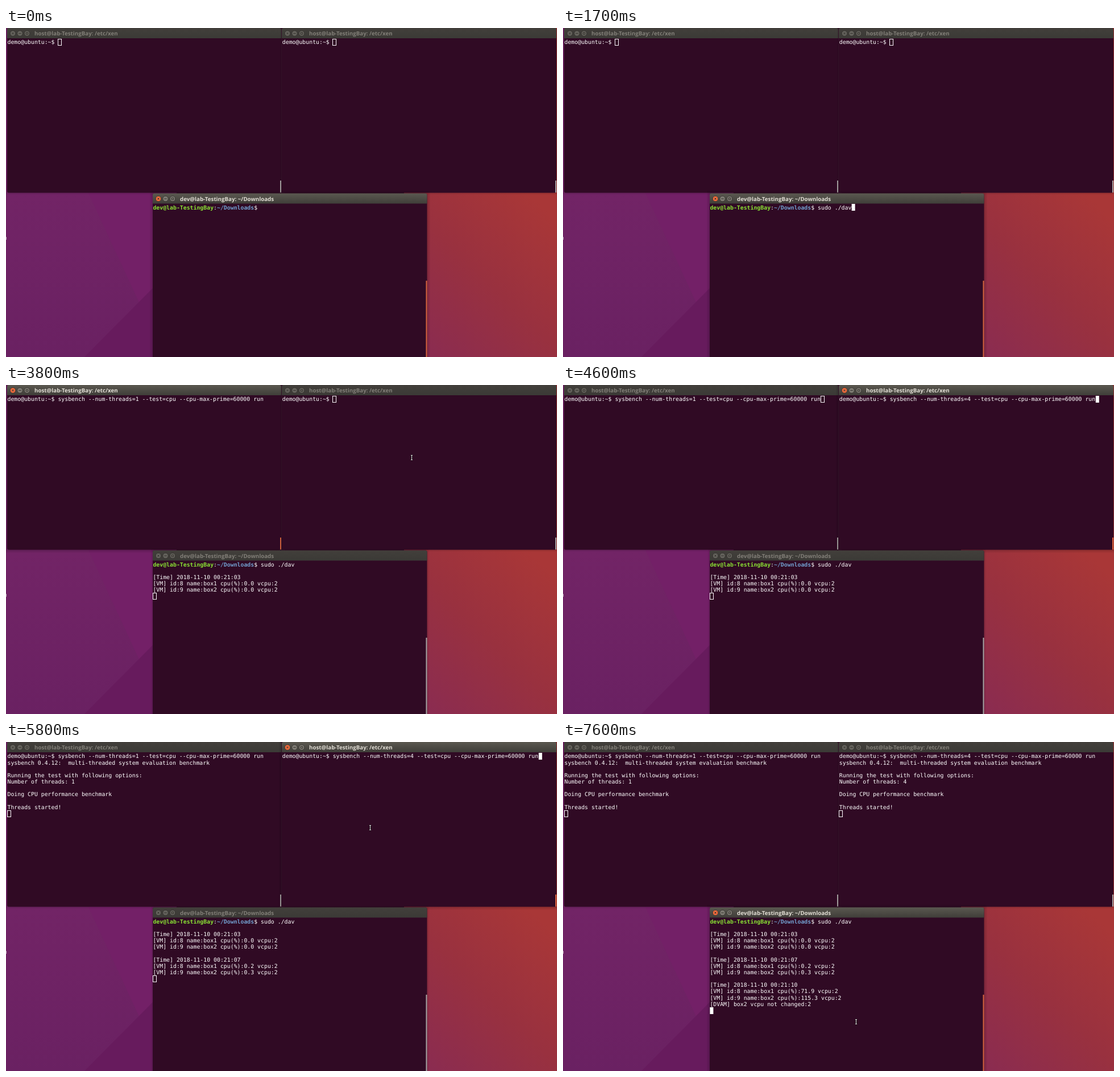
These frames come from a looping animation (969 by 578 pixels, 8000 ms). An HTML page:

```html
<!DOCTYPE html>
<html lang="en">
<head>
<meta charset="utf-8">
<title>Three terminals</title>
<style>
html, body { margin: 0; width: 100%; height: 100%; overflow: hidden; background: #300a24; }
svg { display: block; width: 100%; height: 100%; }
text { white-space: pre; text-rendering: geometricPrecision; }
.term text { font: 9.86px "DejaVu Sans Mono", monospace; fill: #fff; }
.title { font: bold 9.75px "Open Sans", sans-serif; }
.b { font-weight: bold; }
</style>
</head>
<body>
<svg viewBox="0 0 969 578">
  <defs>
    <linearGradient id="left" x1="0" y1="0" x2="0" y2="1">
      <stop offset=".5" stop-color="#722466"/><stop offset="1" stop-color="#6a2162"/>
    </linearGradient>
    <linearGradient id="right" gradientUnits="userSpaceOnUse" x1="725" y1="550" x2="950" y2="320">
      <stop offset="0" stop-color="#8b2c50"/><stop offset=".5" stop-color="#99313f"/><stop offset="1" stop-color="#a93737"/>
    </linearGradient>
    <linearGradient id="on" x2="0" y2="1">
      <stop stop-color="#5b5850"/><stop offset="1" stop-color="#3f3e39"/>
    </linearGradient>
    <linearGradient id="off" x2="0" y2="1">
      <stop stop-color="#423f3b"/><stop offset="1" stop-color="#3b3a36"/>
    </linearGradient>
  </defs>
  <rect width="300" height="578" fill="url(#left)"/>
  <path d="M145 290H258V495H240Z" fill="#732067"/>
  <path d="M258 457V578H138Z" fill="#671b5d"/>
  <rect x="700" width="269" height="578" fill="url(#right)"/>
  <rect x="480" width="10" height="290" fill="#3f1632"/>
  <path d="M0 367v5" stroke="#ddd" stroke-width="1.5"/>
  <g id="scene"></g>
</svg>
<script>
const LOOP = 8000, STEP = 100, CHAR = 5.934, ROW = 11.17;
const scene = document.getElementById('scene');

const HOST = 'lab-TestingBay';
const wins = [
  { x: 2, y: 0, w: 482, h: 289.5, title: `host@${HOST}: /etc/xen`, tx: 2.5, ty: 25, bar: [268, 289] },
  { x: 485, y: 0, w: 483, h: 289.5, title: `host@${HOST}: /etc/xen`, tx: 485.8, ty: 25, bar: [268, 289] },
  { x: 258, y: 290.5, w: 482.5, h: 290, title: `dev@${HOST}: ~/Downloads`, tx: 258.4, ty: 315.2, bar: [444, 578] }
];

const focusAt = [[0, 2], [2700, 0], [4000, 1], [5300, 0], [5800, 1], [6500, 2]];
const blinkFrom = [-600, 300, 1300, 1700, 2200, 2700, 3200, 4000, 4400, 4600, 5300, 5500, 5900, 6400, 7600];

// Pointer trips: shown from, hidden at, then [time, x, y] points
const trips = [
  [300, 1300, [300, 966, 24], [1000, 549, 358]],
  [2500, 3100, [2400, 549, 358], [2700, 334.5, 187.5]],
  [3600, 4400, [3600, 345.5, 184.5], [3800, 713.5, 127.5]],
  [4800, 5500, [4700, 713.5, 127.5], [5200, 339.5, 164.5]],
  [5600, 5900, [5500, 339.5, 164.5], [5800, 640.5, 150.5]],
  [6000, 8000, [5900, 640.5, 150.5], [6300, 515.5, 491.5]]
];

const last = (list, t) => list.filter(e => e[0] <= t).pop()[1];
const rect = (x, y, w, h, extra) => `<rect x="${x}" y="${y}" width="${w}" height="${h}" ${extra}/>`;

function shadow(w, active) {
  let s = '';
  for (let d = 1; d <= (active ? 5 : 3); d += 2)
    s += rect(w.x - d, w.y - d, w.w + 2 * d, w.h + 2 * d, 'rx="4" opacity=".06"');
  return s;
}

function button(x, y, kind, active) {
  const glyph = ['M-1.6-1.6 1.6 1.6M1.6-1.6-1.6 1.6', 'M-2.2 0H2.2', 'M-1.7-1.7H1.7V1.7H-1.7Z'][kind];
  const fill = !active ? '#64625c' : kind ? '#7d7a72' : '#ee6b3d';
  return `<g transform="translate(${x} ${y})"><circle r="4.8" fill="${fill}" stroke="#302f2b" stroke-width=".8"/>
    <path d="${glyph}" fill="none" stroke="#35332e"/></g>`;
}

function cursor(w, col, row, active, lit) {
  const x = w.tx + col * CHAR, y = Math.round(w.ty + row * ROW - 6);
  if (!active) return rect(Math.floor(x) + .5, y + .5, 6, 11, 'fill="none" stroke="#fff"');
  return lit ? rect(x, y, 6, 12, 'fill="#fff"') : '';
}

function drawWindow(w, lines, at, active, hotBar, lit) {
  const cy = w.y + 9.5;
  let s = shadow(w, active) + rect(w.x, w.y, w.w, w.h, 'rx="3" fill="#300a24"');
  s += `<path d="M${w.x} ${w.y + 18}v-15q0-3 3-3h${w.w - 6}q3 0 3 3v15z" fill="url(#${active ? 'on' : 'off'})"/>`;
  for (let i = 0; i < 3; i++) s += button(w.x + 10 + i * 12.5, cy, i, active);
  s += `<text class="title" x="${w.x + 48}" y="${cy + 3.6}" fill="${active ? '#e2ded5' : '#827f78'}">${w.title}</text>`;
  s += rect(w.x + w.w - 2, w.bar[0], 2, w.bar[1] - w.bar[0], `fill="${hotBar ? '#d9643f' : '#aaa5a5'}"`);
  s += '<g class="term">';
  lines.forEach((line, i) => {
    if (line) s += `<text x="${w.tx}" y="${w.ty + 3.4 + i * ROW}">${line}</text>`;
  });
  return s + '</g>' + cursor(w, ...at, active, lit);
}

function benchmark(t, threads, recall, enter) {
  const typed = last([[0, ''], [recall[0], 'clear'],
    [recall[1], `sysbench --num-threads=${threads} --test=cpu --cpu-max-prime=60000 run`]], t);
  const prompt = 'demo@ubuntu:~$ ' + typed;
  if (t < enter) return [[prompt], [prompt.length, 0]];
  return [[prompt, 'sysbench 0.4.12:  multi-threaded system evaluation benchmark', '',
    'Running the test with following options:', 'Number of threads: ' + threads, '',
    'Doing CPU performance benchmark', '', 'Threads started!'], [0, 9]];
}

function monitor(t) {
  const cmd = 'sudo ./dav';
  const n = t < 1300 ? 0 : Math.min(cmd.length, 2 * (Math.floor((t - 1300) / STEP) + 1));
  const lines = [`<tspan class="b" fill="#8ae234">dev@${HOST}</tspan>:` +
    `<tspan class="b" fill="#729fcf">~/Downloads</tspan>$ ` + cmd.slice(0, n)];
  if (t < 2200) return [lines, [`dev@${HOST}:~/Downloads$ `.length + n, 0]];
  const report = (sec, a, b) => lines.push('', '[Time] 2018-11-10 00:21:' + sec,
    `[VM] id:8 name:box1 cpu(%):${a} vcpu:2`, `[VM] id:9 name:box2 cpu(%):${b} vcpu:2`);
  report('03', '0.0', '0.0');
  if (t >= 4900) report('07', '0.2', '0.3');
  if (t >= 7600) {
    report('10', '71.9', '115.3');
    lines.push('[DVAM] box2 vcpu not changed:2');
  }
  return [lines, [0, lines.length]];
}

function pointer(t) {
  const trip = trips.find(p => t >= p[0] && t < p[1]);
  if (!trip) return '';
  const [, , a, b] = trip;
  const k = Math.min(1, (t - a[0]) / (b[0] - a[0]));
  const x = a[1] + (b[1] - a[1]) * k, y = a[2] + (b[2] - a[2]) * k;
  const d = 'M-1.5-4H1.5M0-4V4M-1.5 4H1.5';
  return `<g transform="translate(${x} ${y})"><path d="${d}" stroke="#111" stroke-width="2"/><path d="${d}" stroke="#ddd"/></g>`;
}

function draw(t) {
  const focus = last(focusAt, t);
  const since = t - blinkFrom.filter(b => b <= t).pop();
  const lit = since % 1200 < 600;
  const content = [benchmark(t, 1, [3100, 3200], 5500), benchmark(t, 4, [4400, 4600], 5900), monitor(t)];
  scene.innerHTML = wins.map((w, i) => {
    const hotBar = i === focus || (i === 2 && t < 2800);
    return drawWindow(w, ...content[i], i === focus, hotBar, lit);
  }).join('') + pointer(t);
}

const start = performance.now();
let shown = -1;
function tick() {
  const t = Math.floor(((performance.now() - start) % LOOP) / STEP) * STEP;
  if (t !== shown) draw(shown = t);
  requestAnimationFrame(tick);
}
tick();
</script>
</body>
</html>
```
